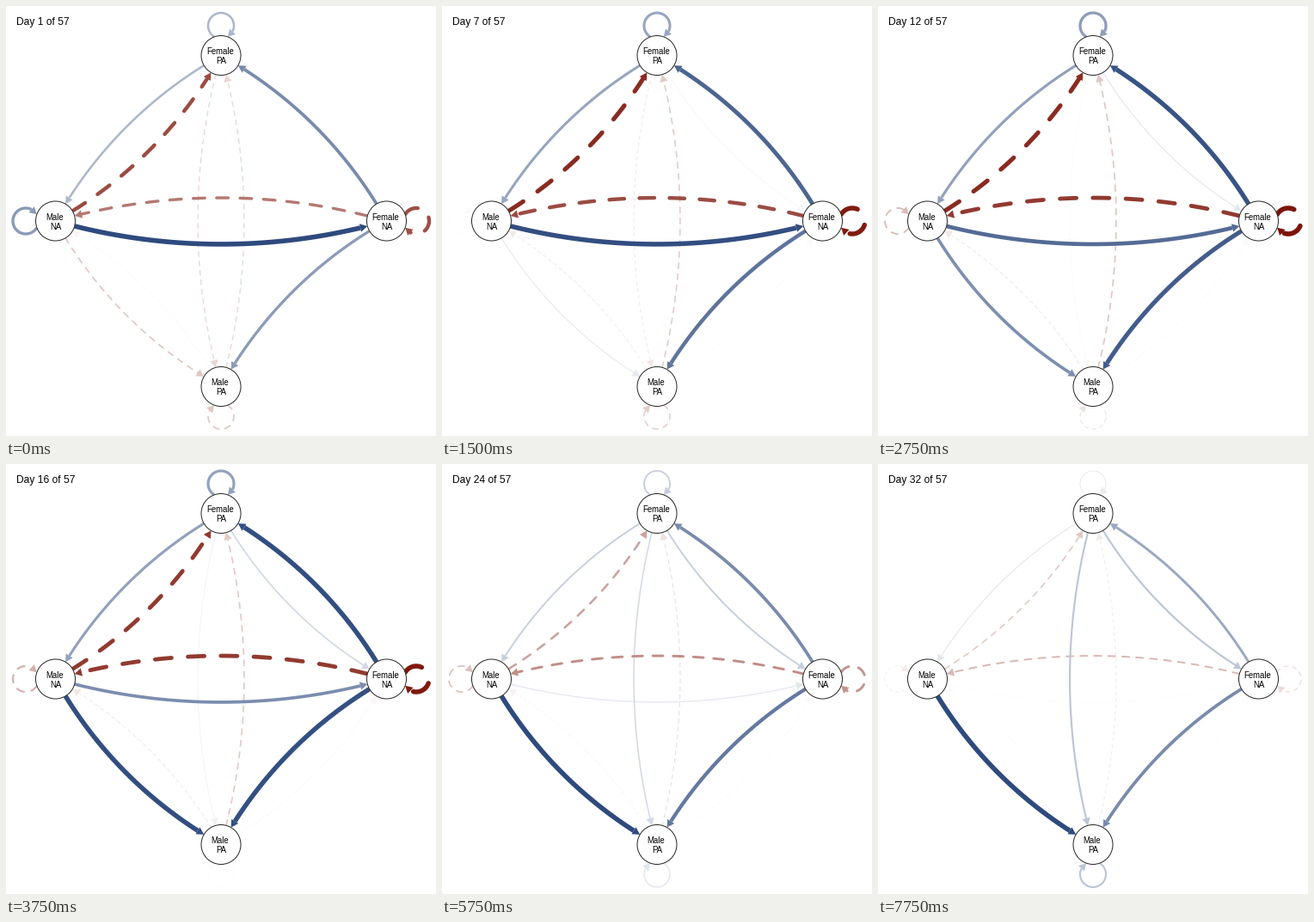
Animation, 500 px wide and 500 px high, one loop 8000 ms. Source, as a matplotlib script:

```python
import numpy as np
import matplotlib.pyplot as plt
from matplotlib.animation import FuncAnimation
from matplotlib.patches import Circle, Polygon

SIZE, DPI = 500, 100
PX = 72 / DPI               # points per pixel
DAYS, SHOWN = 57, 32
NODE_R, LOOP_R, LOOP_D = 23, 15, 34.5
HEAD_L, HEAD_W = 8.5, 9.5
BLUE = np.array([46, 74, 126]) / 255
RED = np.array([124, 20, 8]) / 255

NODES = {
    "FP": (250, 57.5, "Female", "PA"),
    "MN": (57.5, 250, "Male", "NA"),
    "FN": (442.5, 250, "Female", "NA"),
    "MP": (250, 442.5, "Male", "PA"),
}

# Signed edge strength on each key day: positive is solid blue, negative dashed red
KEY_DAYS = np.array([1, 7, 12, 16, 20, 24, 32])
WEIGHTS = {
    ("MN", "FN"): (1, .98, .82, .63, .34, .14, -.03),
    ("FN", "MN"): (-.57, -.76, -.84, -.84, -.64, -.48, -.30),
    ("MN", "FP"): (-.76, -.90, -.90, -.84, -.58, -.40, -.23),
    ("FP", "MN"): (.40, .50, .52, .52, .38, .27, .13),
    ("FN", "FP"): (.64, .85, .95, .98, .80, .64, .48),
    ("FP", "FN"): (0, .05, .13, .22, .22, .27, .32),
    ("FN", "MP"): (.55, .77, .90, .97, .83, .74, .64),
    ("MP", "FN"): (0, -.02, -.03, -.04, -.03, -.03, -.02),
    ("MN", "MP"): (-.24, .12, .62, .98, 1, 1, 1),
    ("MP", "MN"): (-.04, -.09, -.10, -.10, -.07, -.05, -.02),
    ("FP", "MP"): (-.17, -.10, -.04, .07, .14, .21, .32),
    ("MP", "FP"): (-.17, -.22, -.24, -.23, -.18, -.13, -.09),
    ("FP", "FP"): (.40, .50, .54, .52, .36, .27, .11),
    ("MN", "MN"): (.56, -.02, -.28, -.33, -.32, -.26, -.08),
    ("FN", "FN"): (-.75, -.97, -1, -.98, -.67, -.46, -.15),
    ("MP", "MP"): (-.24, -.21, -.12, -.02, .08, .15, .32),
}


def smooth(day, values):
    """Cubic Hermite interpolation through the key days."""
    v = np.array(values, float)
    slope = np.gradient(v, KEY_DAYS)
    i = min(np.searchsorted(KEY_DAYS, day, side="right") - 1, len(v) - 2)
    h = KEY_DAYS[i + 1] - KEY_DAYS[i]
    s = (day - KEY_DAYS[i]) / h
    w = ((1 + 2 * s) * (1 - s) ** 2 * v[i] + s * (1 - s) ** 2 * h * slope[i]
         + s * s * (3 - 2 * s) * v[i + 1] + s * s * (s - 1) * h * slope[i + 1])
    return float(np.clip(w, -1, 1))


def link_arc(a, b):
    """Circle centre, radius and end angles of the bowed link from a to b."""
    a, b = np.array(a), np.array(b)
    length = np.hypot(*(b - a))
    d = (b - a) / length
    side = np.array([-d[1], d[0]])
    half = 2 * np.arctan(0.14)
    r = length / (2 * np.sin(half))
    centre = (a + b) / 2 - side * r * np.cos(half)
    mid = np.arctan2(side[1], side[0])
    reach = half - 2 * np.arcsin(NODE_R / (2 * r))
    return centre, r, mid + reach, mid - reach


def loop_arc(a):
    """Same for the self-loop on the outer side of node a."""
    a = np.array(a)
    out = (a - SIZE / 2) / np.hypot(*(a - SIZE / 2))
    along = (LOOP_D ** 2 + NODE_R ** 2 - LOOP_R ** 2) / (2 * LOOP_D)
    gap = np.arctan2(np.sqrt(NODE_R ** 2 - along ** 2), LOOP_D - along)
    mid = np.arctan2(out[1], out[0])
    return a + out * LOOP_D, LOOP_R, mid - np.pi + gap, mid + np.pi - gap


class Edge:
    def __init__(self, ax, start, end, values):
        self.values = values
        a, b = NODES[start][:2], NODES[end][:2]
        centre, r, t0, t1 = loop_arc(a) if start == end else link_arc(a, b)

        def at(t):
            return centre + r * np.stack([np.cos(t), np.sin(t)], axis=-1)

        neck = t1 - np.sign(t1 - t0) * HEAD_L / r
        path = at(np.linspace(t0, neck, 80))
        tip, base = at(t1), at(neck)
        d = (tip - base) / np.hypot(*(tip - base))
        side = np.array([-d[1], d[0]]) * HEAD_W / 2
        self.line, = ax.plot(path[:, 0], path[:, 1], solid_capstyle="butt",
                             dash_capstyle="round")
        self.head = ax.add_patch(Polygon([tip, base + side, base - side], lw=0))

    def update(self, day):
        w = smooth(day, self.values)
        t = abs(w)
        color = 1 - t * (1 - (BLUE if w > 0 else RED))
        self.line.set_linewidth((0.5 + 5.1 * t) * PX)
        self.line.set_linestyle("-" if w > 0 else (0, (4, 4)))
        self.line.set_color(color)
        self.head.set_facecolor(color)
        for part in (self.line, self.head):
            part.set_zorder(1 + t)
            part.set_visible(t > 0.008)


plt.rcParams["font.family"] = "Liberation Sans"
fig = plt.figure(figsize=(SIZE / DPI, SIZE / DPI), dpi=DPI, facecolor="white")
ax = fig.add_axes([0, 0, 1, 1])
ax.set_xlim(0, SIZE)
ax.set_ylim(SIZE, 0)
ax.axis("off")

edges = [Edge(ax, *ends, values) for ends, values in WEIGHTS.items()]
for x, y, who, mood in NODES.values():
    ax.add_patch(Circle((x, y), NODE_R, fc="white", ec="#282828", lw=PX, zorder=4))
    for text, tx, ty in ((who, x - 1.3, y - 1.3), (mood, x, y + 9.7)):
        ax.text(tx, ty, text, size=9.7 * PX, ha="center", va="baseline", zorder=5)
title = ax.text(12, 22, "", size=12 * PX, va="baseline", zorder=5)


def draw(i):
    day = i + 1
    title.set_text(f"Day {day} of {DAYS}")
    for edge in edges:
        edge.update(day)
    return []


anim = FuncAnimation(fig, draw, frames=SHOWN, interval=250, repeat=True, repeat_delay=0)
plt.show()
```
